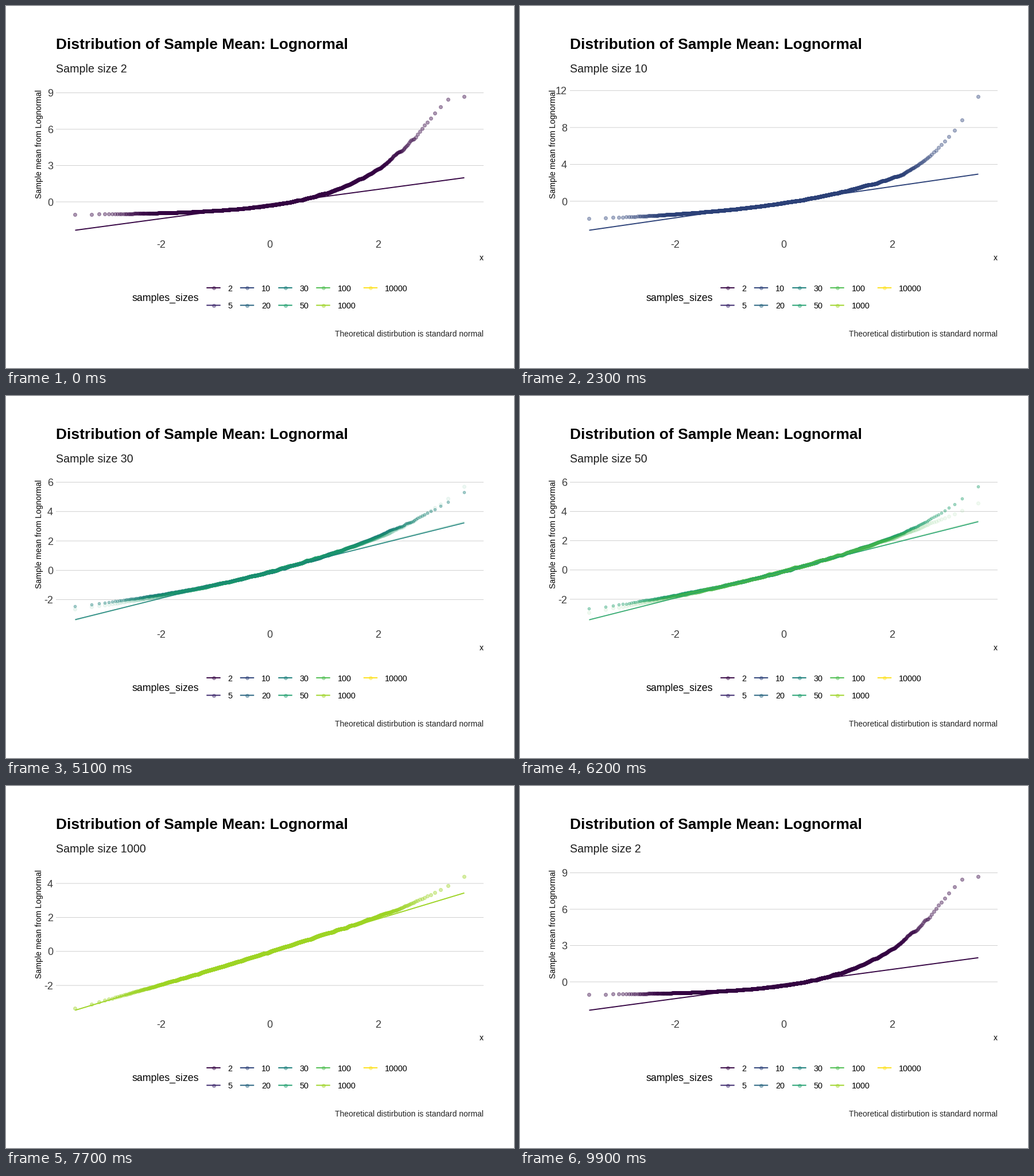
Recreate the animation shown at these times as a matplotlib script. Size 885x632 px, loop 10000 ms.

```python
import numpy as np
import matplotlib.pyplot as plt
from matplotlib.animation import FuncAnimation

W, H, DPI = 885, 632, 100
PT = 72 / DPI
FRAMES, INTERVAL = 100, 100
N = 3000
LEFT, RIGHT, TOP, BOTTOM = 87, 832, 158.2, 391.5
X0, X_UNIT = 459.5, 94.5
ALPHA, DOT, EDGE, LINE = 0.4, 5.9, 1.1, 1.9

SIZES = [2, 5, 10, 20, 30, 50, 100, 1000, 10000]
PEAKS = [8.69, 10.9, 11.35, 7.2, 5.32, 5.7, 4.58, 4.4, 3.62]

# Rests and moves of the nine states, in frames
HOLDS = [6, 7, 7, 7, 6, 7, 7, 7, 7]
MOVES = [5] * 2 + [4] * 7
ENDS = np.cumsum(np.add(HOLDS, MOVES))
STARTS = ENDS - MOVES


def normal_quantiles(n):
    grid = np.linspace(-5, 5, 20001)
    cdf = np.cumsum(np.exp(-grid ** 2 / 2))
    p = (np.arange(n) + .5) / n
    return np.interp(p, cdf / cdf[-1], grid)


def gamma18(rgb):
    """sRGB values re-encoded with a 1.8 gamma."""
    v = np.array(rgb[:3])
    lin = np.where(v <= .04045, v / 12.92, ((v + .055) / 1.055) ** 2.4)
    return tuple(lin ** (1 / 1.8))


rng = np.random.default_rng(7)
Z = normal_quantiles(N)
XS = X0 + X_UNIT * Z


def sample(n, peak):
    """Sorted standardized means of n lognormals, and the ends of their line."""
    var = np.log1p((np.e - 1) / n)
    sigma = np.sqrt(var)

    def quantile(z):
        return (np.exp(sigma * z - var / 2) - 1) / np.sqrt(np.expm1(var))

    # Sampling noise in the body, then a tail bent towards the peak
    knots = np.arange(-3, 2.85, .08)
    bumps = rng.normal(0, .018, len(knots))
    bumps[[0, -1]] = 0
    y = quantile(Z + np.interp(Z, knots, bumps))
    gap = peak - quantile(Z[-1])
    reach = np.clip((Z - 2) / (Z[-1] - 2), 0, 1)
    y = np.maximum.accumulate(y + gap * reach ** (2 if gap > 0 else 6))

    q1, q3 = quantile(-.6745), quantile(.6745)
    slope = (q3 - q1) / 1.349 * (.965 - .05 * sigma)
    return y, (q1 + q3) / 2 + slope * Z[[0, -1]]


DATA, ENDPTS = zip(*map(sample, SIZES, PEAKS))
COLORS = [gamma18(plt.cm.viridis(i / 8)) for i in range(9)]
GREY = gamma18((.302,) * 3)
GRID = gamma18((.8,) * 3)

plt.rcParams["font.family"] = "Liberation Sans"
fig = plt.figure(figsize=(W / DPI, H / DPI), dpi=DPI, facecolor="white")
ax = fig.add_axes([0, 0, 1, 1])
ax.set_xlim(0, W)
ax.set_ylim(H, 0)
ax.axis("off")


def label(x, y, s, px, **kw):
    return ax.text(x, y, s, fontsize=px * PT, va=kw.pop("va", "baseline"), **kw)


def stroke(color, z, px=LINE):
    return ax.plot([], [], color=color, lw=px * PT, zorder=z, snap=False,
                   solid_capstyle="butt")[0]


def dots(z):
    return ax.plot([], [], "o", zorder=z)[0]


def style_dots(artist, color, size=1, alpha=1):
    rgba = (*color, ALPHA * alpha)
    artist.set(markersize=DOT * size * PT, markeredgewidth=EDGE * size * PT,
               markerfacecolor=rgba, markeredgecolor=rgba)


def draw_static():
    label(87, 75, "Distribution of Sample Mean: Lognormal", 26.45, weight="bold")
    label(58, 241, "Sample mean from Lognormal", 14, rotation=90,
          ha="center", va="center")
    for v in (-2, 0, 2):
        label(X0 + v * X_UNIT, 422.5, str(v), 18, color=GREY, ha="center")
    label(832, 444, "x", 14, ha="right")
    label(832, 577, "Theoretical distirbution is standard normal", 13.95,
          ha="right", color="#222222")
    label(220, 514.5, "samples_sizes", 17.7)
    columns = (361.5, 420, 486.5, 552.5, 635)
    for i, (n, color) in enumerate(zip(SIZES, COLORS)):
        x, y = columns[i // 2], 492 + 30.5 * (i % 2)
        key = dots(2)
        key.set_data([x], [y])
        style_dots(key, color)
        stroke(color, 3).set_data([x - 12.2, x + 12.2], [y, y])
        label(x + 25, y + 5.5, str(n), 14.4)


draw_static()
subtitle = label(87, 116, "", 19.65, color="#1a1a1a")
ticks = [(stroke(GRID, 1, .75), label(82, 0, "", 18, color=GREY, ha="right"))
         for _ in range(6)]
old_dots, new_dots = dots(2), dots(3)
old_line, new_line = stroke("k", 4), stroke("k", 5)


def locate(frame):
    """Current state, next state and progress between them."""
    for i, (start, end) in enumerate(zip(STARTS, ENDS)):
        if frame < start:
            return i, i, 0
        if frame < end:
            return i, (i + 1) % 9, (frame - start + 1) / (end - start + 1)
    return 0, 0, 0


def draw(frame):
    a, b, t = locate(frame)
    seen = np.concatenate([DATA[a], DATA[b], ENDPTS[a], ENDPTS[b]])
    lo, hi = seen.min(), seen.max()
    span = hi - lo

    def to_px(v):
        return BOTTOM - (v - lo) * (BOTTOM - TOP) / span

    step = 2 if span < 10.8 else 3 if span < 13 else 4
    first = int(np.ceil((lo - .05 * span) / step))
    last = int(np.floor((hi + .05 * span) / step))
    values = [k * step for k in range(first, last + 1)]
    for k, (grid, text) in enumerate(ticks):
        shown = k < len(values)
        grid.set_visible(shown)
        text.set_visible(shown)
        if shown:
            y = to_px(values[k])
            grid.set_data([LEFT, RIGHT], [y, y])
            text.set_text(str(values[k]))
            text.set_y(y + 6.7)

    ends = XS[[0, -1]]
    old_dots.set_data(XS, to_px(DATA[a]))
    style_dots(old_dots, COLORS[a], size=1 - t)
    old_line.set_data(ends, to_px(ENDPTS[a]))
    old_line.set(color=COLORS[a], linewidth=LINE * PT * (1 - t))
    for artist in (new_dots, new_line):
        artist.set_visible(t > 0)
    if t > 0:
        new_dots.set_data(XS, to_px(DATA[b]))
        style_dots(new_dots, COLORS[b], alpha=t)
        new_line.set_data(ends, to_px(ENDPTS[b]))
        new_line.set_color((*COLORS[b], t))
    subtitle.set_text(f"Sample size {SIZES[b if t >= .5 else a]}")
    return []


anim = FuncAnimation(fig, draw, frames=FRAMES, interval=INTERVAL,
                     init_func=lambda: [], repeat=True, repeat_delay=0)
plt.show()
```
